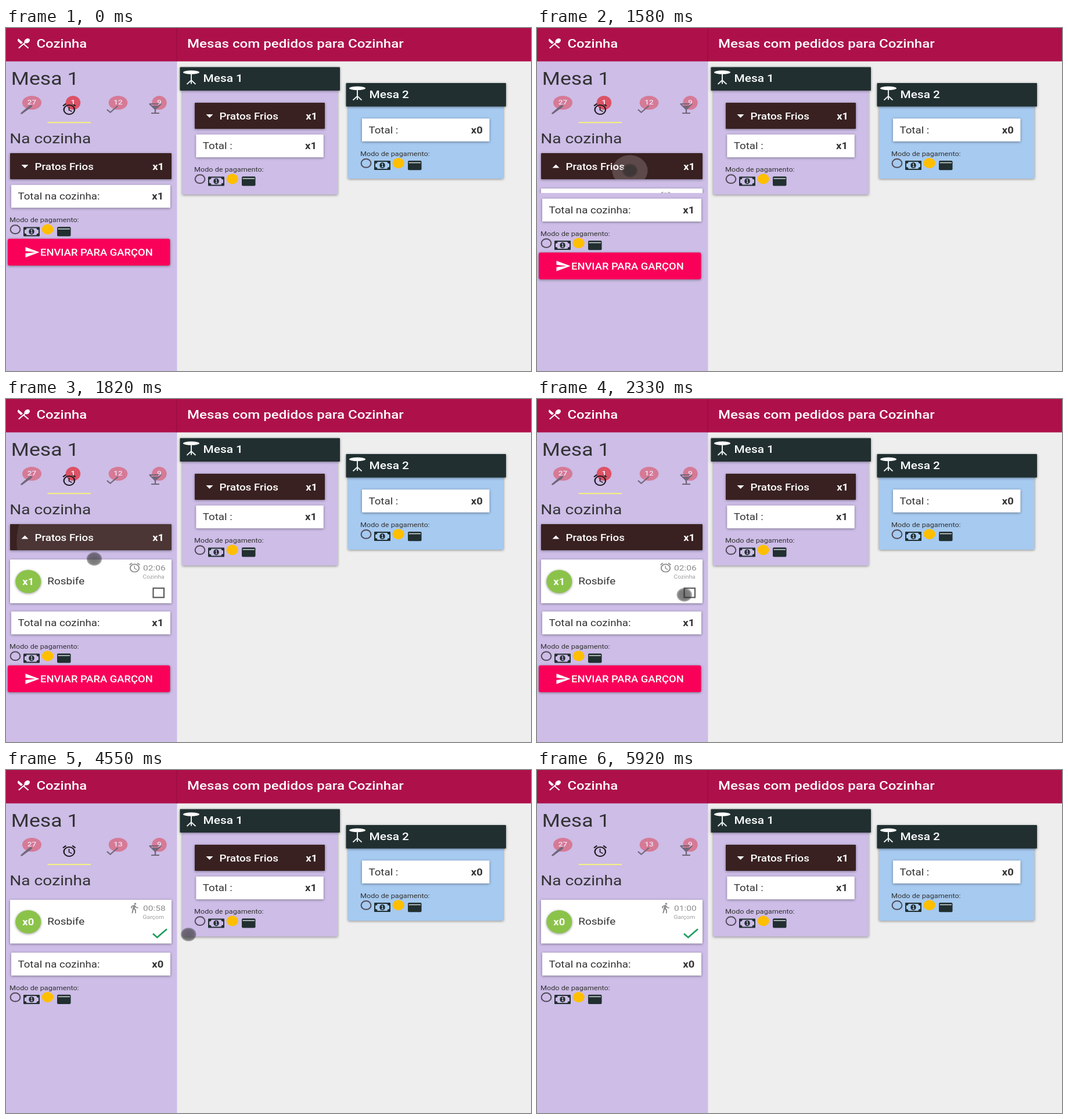
Recreate the animation shown at these times as an HTML page. Size 904 px wide and 592 px high, loop 6.28 s.

```html
<!DOCTYPE html>
<html lang="pt">
<head>
<meta charset="utf-8">
<title>Cozinha</title>
<style>
  html, body { margin: 0; width: 100%; height: 100%; overflow: hidden; background: #eee; }
  svg { display: block; width: 904px; height: 592px; }
  text { font-family: Roboto, Arial, sans-serif; white-space: pre; }
  .raised { filter: drop-shadow(0 1.5px 2px rgba(0, 0, 0, .42)); }
</style>
</head>
<body>
<svg id="stage" viewBox="0 0 904 592" xmlns="http://www.w3.org/2000/svg"></svg>
<script>
const LOOP = 6280;
const WIDE = 1.15; // the whole interface is shown slightly widened
const INK = '#333', DARK = '#212f30', BROWN = '#392121', LILAC = '#cdbde7', BLUE = '#a6caf0';

const ICONS = {
  menu: 'M8.1 13.34l2.83-2.83L3.91 3.5c-1.56 1.56-1.56 4.09 0 5.66l4.19 4.18zm6.78-1.81c1.53.71 3.68.21 5.27-1.38 1.91-1.91 2.28-4.65.81-6.12-1.46-1.46-4.2-1.1-6.12.81-1.59 1.59-2.09 3.74-1.38 5.27L3.7 19.87l1.41 1.41L12 14.41l6.88 6.88 1.41-1.41L13.41 13l1.47-1.47z',
  knife: 'M1.5 20.5L11 11L15 7L19 4.5L21.5 7L18 11L14 14L4 22.5L1.5 23z',
  alarm: 'M22 5.72l-4.6-3.86-1.29 1.53 4.6 3.86zM7.88 3.39L6.6 1.86 2 5.71l1.29 1.53zM12.5 8H11v6l4.75 2.85.75-1.23-4-2.37zM12 4a9 9 0 1 0 0 18a9 9 0 1 0 0-18zm0 16a7 7 0 1 1 0-14a7 7 0 1 1 0 14z',
  done: 'M9 16.2L4.8 12l-1.4 1.4L9 19 21 7l-1.4-1.4z',
  bar: 'M21 5V3H3v2l8 9v5H6v2h12v-2h-5v-5zM7.43 7L5.66 5h12.69l-1.78 2z',
  send: 'M2 21L23 12 2 3v7l15 2-15 2z',
  walk: 'M13.5 5.5a2 2 0 1 0 0-4a2 2 0 1 0 0 4zM9.8 8.9L7 23h2.1l1.8-8 2.1 2v6h2v-7.5l-2.1-2 .6-3C14.8 12 16.8 13 19 13v-2c-1.9 0-3.5-1-4.3-2.4l-1-1.6c-.4-.6-1-1-1.7-1-.3 0-.5.1-.8.1L6 8.3V13h2V9.6z'
};

const rect = (x, y, w, h, fill, extra = '') =>
  `<rect x="${x}" y="${y}" width="${w}" height="${h}" fill="${fill}" ${extra}/>`;
const raised = (x, y, w, h, fill, r = 1) => rect(x, y, w, h, fill, `rx="${r}" class="raised"`);
const oval = (x, y, rx, ry, extra) => `<ellipse cx="${x}" cy="${y}" rx="${rx}" ry="${ry}" ${extra}/>`;
const text = (x, y, size, str, fill = INK, weight = 400, id = '') =>
  `<text id="${id}" transform="translate(${x} ${y}) scale(${WIDE} 1)" font-size="${size}" font-weight="${weight}" fill="${fill}">${str}</text>`;
const icon = (name, cx, cy, fill, size = 24, id = '') =>
  `<path id="${id}" d="${ICONS[name]}" fill="${fill}" fill-rule="evenodd" transform="translate(${cx} ${cy}) scale(${size / 24 * WIDE} ${size / 24}) translate(-12 -12)"/>`;
const group = (id, body, extra = '') => `<g id="${id}" ${extra}>${body}</g>`;

function banknote(x, y, paper) {
  return `<g transform="translate(${x} ${y})">${rect(0, 0, 28, 16, DARK, 'rx="1"')}
    <path d="M5.5 2H22.5Q22.5 5 26 5V11Q22.5 11 22.5 14H5.5Q5.5 11 2 11V5Q5.5 5 5.5 2Z" fill="${paper}"/>
    ${oval(14, 8, 4.7, 5, `fill="${DARK}"`)}
    <path d="M12.7 6.2L14.3 5.2V10.3M12.5 10.6H16" fill="none" stroke="${paper}" stroke-width="1.2"/></g>`;
}

function payment(x, y, paper) {
  return text(x, y, 11, 'Modo de pagamento:') +
    oval(x + 10, y + 12.7, 8.4, 7.4, 'fill="none" stroke="#514a57" stroke-width="2"') +
    banknote(x + 24, y + 8.4, paper) +
    oval(x + 65.7, y + 12.5, 10, 9, 'fill="#ffbf00"') +
    rect(x + 82, y + 8.2, 23.5, 16.3, DARK, 'rx="2"') +
    rect(x + 83.5, y + 11, 20.5, 1.6, '#c9d0d2');
}

const total = (x, y, w, label, count, id) =>
  raised(x, y, w, 39.5, '#fff') + text(x + 11.4, y + 25.3, 16.3, label) +
  text(x + w - 31.7, y + 25.3, 16, count, INK, 700, id);

const dishRow = (x, y, w) => raised(x, y, w, 45, BROWN);
const dishText = (x, y, w, id) =>
  `<path id="${id}" d="M${x + 19.5} ${y + 20}h12l-6 6z" fill="#fff"/>` +
  text(x + 42.4, y + 28.5, 16.35, 'Pratos Frios', '#fff', 500) +
  text(x + w - 32.8, y + 28.5, 16, 'x1', '#fff', 700);

function tableHead(x, y, title) {
  return raised(x, y, 275.5, 40.5, DARK) +
    oval(x + 19.5, y + 9, 14, 3.3, 'fill="#fff"') +
    `<path d="M${x + 19.5} ${y + 11}v18M${x + 12} ${y + 29.5}l7.5-7 7.5 7" fill="none" stroke="#e8ecec" stroke-width="2"/>` +
    text(x + 40, y + 25.5, 18.1, title, '#fff', 500);
}

const badge = (x, rx, id = '') => oval(x, 129, rx, 12, `id="${id}" fill="#dc5266"`);
const badgeText = (x, label, id = '') =>
  text(x - label.length * 3.9, 132.2, 11.8, label, '#fff', 500, id);
const idleTab = (x, rx, label, picture, id) =>
  `<g opacity=".62">${badge(x, rx)}${picture}${badgeText(x, label, id)}</g>`;

const tabs =
  idleTab(44.5, 16.5, '27', icon('knife', 36, 139, '#3a3338', 21)) +
  badge(115.5, 12.7, 'activeBadge') + icon('alarm', 108.8, 140, '#1f1a1f') +
  badgeText(115.5, '1', 'activeCount') +
  idleTab(193, 16.3, '12', icon('done', 183, 140, '#3a3338'), 'doneCount') +
  idleTab(264, 12.7, '9', icon('bar', 257, 139, '#3a3338')) +
  rect(71.5, 162, 74.5, 2.2, '#f4ef84');

const item =
  raised(7, 277, 278, 75.5, '#fff') +
  oval(38.3, 315, 22, 20, 'fill="#8bc34a" class="raised"') +
  text(28.3, 320.5, 16, 'x1', '#fff', 700, 'dishCount') +
  text(71.3, 320.3, 16.5, 'Rosbife') +
  icon('alarm', 221.5, 291, '#8d8d8d', 20, 'cooking') +
  icon('walk', 221, 291, '#8d8d8d', 20, 'serving') +
  text(236, 296, 13.5, '02:06', '#8d8d8d', 400, 'clock') +
  text(235.5, 309.7, 9, 'Cozinha', '#9c9c9c', 400, 'place') +
  rect(253.5, 326.5, 18.5, 16, 'none', 'id="box" stroke="#5a5a5a" stroke-width="2.2"') +
  '<path id="tick" d="M253 335.5L260.3 342L277 327.5" fill="none" stroke="#1c9e60" stroke-width="2.8" pathLength="1" stroke-dasharray="1"/>';

const lower =
  total(9, 270.7, 274, 'Total na cozinha:', 'x1', 'totalCount') +
  payment(6, 335, LILAC) +
  group('button', raised(3, 363.7, 279.5, 46.3, '#f90159', 3) +
    icon('send', 45, 387, '#fff') + text(59, 393, 16, 'ENVIAR PARA GARÇON', '#fff', 500));

const stage = document.getElementById('stage');
stage.innerHTML = `<defs>
    <clipPath id="rowClip"><rect x="7" y="216" width="278" height="45"/></clipPath>
    <clipPath id="itemClip"><rect id="reveal" x="0" y="261" width="294" height="0"/></clipPath>
    <radialGradient id="pointerFill">
      <stop offset="0" stop-color="#2c2c2c" stop-opacity=".66"/>
      <stop offset=".75" stop-color="#2c2c2c" stop-opacity=".6"/>
      <stop offset="1" stop-color="#2c2c2c" stop-opacity=".36"/>
    </radialGradient>
  </defs>` +
  rect(0, 0, 904, 592, '#eee') + rect(0, 57, 294.5, 535, LILAC) +
  rect(0, 0, 904, 57.6, '#ae104a') + rect(293.5, 0, 1.2, 57.6, '#930c3e') +
  icon('menu', 30.2, 26.5, '#fff', 23) +
  text(52.5, 34, 20.8, 'Cozinha', '#fff', 500) +
  text(312, 34, 20.95, 'Mesas com pedidos para Cozinhar', '#fff', 500) +
  text(8.8, 98, 31, 'Mesa 1') + tabs + text(6.2, 198.5, 24.5, 'Na cozinha') +
  group('row', dishRow(7, 216, 278) +
    group('', oval(160, 246, 0, 0, 'id="ripple" fill="#fff"'), 'clip-path="url(#rowClip)"') +
    dishText(7, 216, 278, 'arrow')) +
  group('', group('item', item), 'clip-path="url(#itemClip)"') +
  group('lower', lower) +
  raised(303.5, 100, 267.5, 187.5, LILAC) + tableHead(299.5, 67.5, 'Mesa 1') +
  dishRow(325, 129, 224) + dishText(325, 129, 224, '') +
  total(327.3, 183.7, 219.5, 'Total :', 'x1', '') + payment(324, 248, LILAC) +
  raised(589, 125, 267.5, 135, BLUE) + tableHead(585.5, 95, 'Mesa 2') +
  total(613, 156.3, 219.5, 'Total :', 'x0', '') + payment(610, 220.7, BLUE) +
  oval(0, 0, 13.2, 11.7, 'id="pointer" fill="url(#pointerFill)"');

const parts = {};
stage.querySelectorAll('[id]').forEach(el => { if (el.id) parts[el.id] = el; });

const clamp = v => Math.min(1, Math.max(0, v));
const smooth = v => { v = clamp(v); return v * v * (3 - 2 * v); };
const set = (id, attrs) => { for (const k in attrs) parts[id].setAttribute(k, attrs[k]); };
const show = (id, on) => { parts[id].style.display = on ? '' : 'none'; };
const write = (id, str) => { if (parts[id].textContent !== str) parts[id].textContent = str; };

// time, x, y of the pointer
const PATH = [
  [390, 487, 26], [570, 130, 287], [690, 130, 287], [1010, 159, 247], [1170, 159.5, 248],
  [1320, 160, 250], [1480, 160, 246], [1600, 160, 246], [1820, 152, 276], [2090, 211, 338],
  [2420, 263, 338], [3150, 263, 337], [4259, 263, 337], [4260, 280, 322], [4440, 280, 322],
  [4920, 533, 41], [5079, 533, 41], [5080, 535, 40], [5220, 535, 40], [5360, 592, -4]
];

function pointerAt(t) {
  const i = PATH.findIndex(p => p[0] > t);
  if (i < 1) return null;
  const [a, b] = [PATH[i - 1], PATH[i]];
  const k = smooth((t - a[0]) / (b[0] - a[0]));
  return [a[1] + (b[1] - a[1]) * k, a[2] + (b[2] - a[2]) * k];
}

function render(t) {
  const served = t >= 3150;
  const settled = t >= 3180;
  const open = smooth((t - 1500) / 250);
  const shift = served ? 44.5 : 96 * open;

  show('row', !served);
  set('arrow', { d: t >= 1500 ? 'M26.5 241.5h12l-6-6z' : 'M26.5 236h12l-6 6z' });
  const radius = Math.max(0, (t - 1515) * 0.463);
  set('ripple', { rx: radius, ry: radius / WIDE, opacity: 0.18 * clamp((2070 - t) / 490) });

  set('reveal', served ? { y: 210, height: 100 } : { y: 261, height: shift });
  show('item', open > 0);
  set('item', { transform: `translate(0 ${served ? -53 : 0})` });
  set('lower', { transform: `translate(0 ${shift})` });

  show('cooking', !served);
  show('serving', served);
  write('place', served ? 'Garçom' : 'Cozinha');
  write('clock', t < 3150 ? '02:06' : t < 3860 ? '02:08' : t < 5920 ? '00:58' : '01:00');
  write('dishCount', served ? 'x0' : 'x1');
  write('totalCount', settled ? 'x0' : 'x1');
  write('doneCount', settled ? '13' : '12');
  show('activeBadge', !settled);
  show('activeCount', !settled);
  show('button', !settled);

  const tick = clamp((t - 3180) / 150);
  set('box', { stroke: served ? '#1f5f80' : '#5a5a5a', opacity: 1 - tick });
  show('tick', tick > 0);
  set('tick', { 'stroke-dashoffset': 1 - tick });

  const spot = pointerAt(t);
  show('pointer', spot);
  if (spot) set('pointer', { cx: spot[0], cy: spot[1] });
}

const start = performance.now();
function frame() {
  render((performance.now() - start) % LOOP);
  requestAnimationFrame(frame);
}
frame();
</script>
</body>
</html>
```
